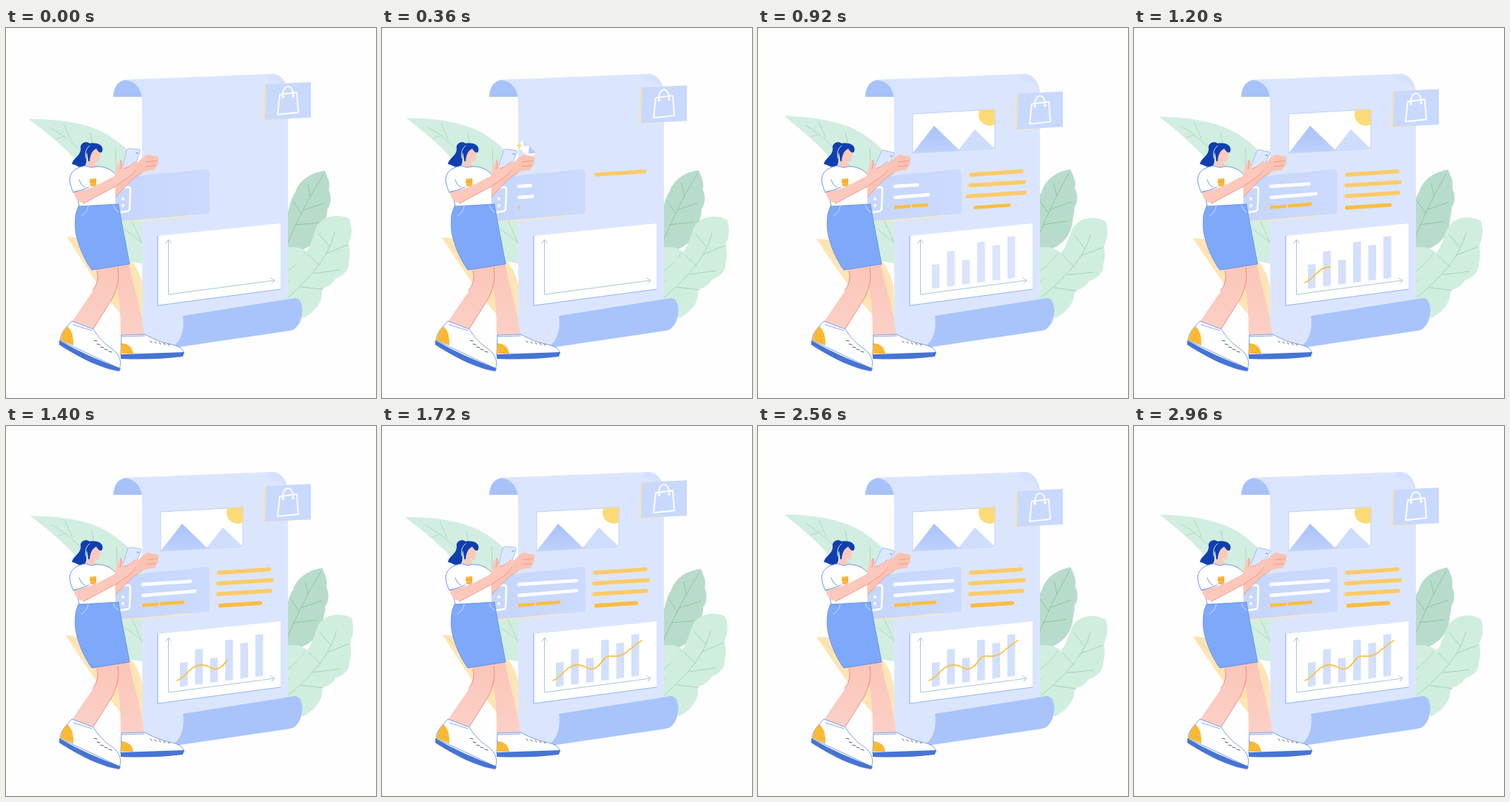
These frames come from a looping animation (500x500 px, 3000 ms). An HTML page:

```html
<!DOCTYPE html>
<html lang="en">
<head>
<meta charset="utf-8">
<style>
html, body { margin: 0; width: 100%; height: 100%; overflow: hidden; background: #fefefe; }
svg { display: block; width: 100vw; height: 100vh; }
.line { fill: none; stroke-linecap: round; stroke-linejoin: round; }
</style>
</head>
<body>
<svg viewBox="0 0 500 500">
  <defs>
    <clipPath id="photoClip"><path d="M209 116L320 110V163L209 169Z"/></clipPath>
    <clipPath id="barClip"><rect id="barWipe" x="220" y="280" width="140" height="90"/></clipPath>
    <linearGradient id="cardFill"><stop stop-color="#c6d6fc"/><stop offset="1" stop-color="#ccdafd"/></linearGradient>
    <linearGradient id="legFill" x2="0" y2="1"><stop stop-color="#fbc5b8"/><stop offset="1" stop-color="#fcd0c7"/></linearGradient>
    <linearGradient id="hillFill" x2="0" y2="1"><stop stop-color="#a9c2fa"/><stop offset="1" stop-color="#bfd1fc"/></linearGradient>
  </defs>

  <g id="yellowLeaf">
    <path fill="#fee5b6" d="M82 282C112 284 142 290 160 304C174 316 183 334 185 350V414C156 396 122 345 82 282Z"/>
    <path class="line" stroke="#f8cf86" stroke-width=".8" d="M88 286Q140 335 180 405M115 309L114 322M150 350L162 340"/>
  </g>
  <g id="leftLeaf">
    <path fill="#d1eee0" d="M31 123C75 123 112 129 137 144C160 158 178 176 186 195V318C160 318 130 300 112 260C106 235 104 200 92 176C74 156 50 138 31 123Z"/>
    <path class="line" stroke="#aed5c3" stroke-width=".9" d="M60 135C100 155 155 220 184 292M88 151L78 130M122 181L114 142M150 216L148 163M80 146L68 150M168 250L184 255M160 272L184 290"/>
  </g>
  <g id="darkLeaf">
    <path fill="#b7dccb" d="M431 193C412 195 396 206 391 222C386 228 384 238 380 252V304C404 302 427 290 431 264C432 256 435 250 434 245C440 238 440 226 436 219C439 211 435 202 431 193Z"/>
    <path class="line" stroke="#93bea9" stroke-width=".9" d="M429 198C412 225 398 251 380 291M411 228L408 211M399 251L388 234M402 246L430 237M391 266L423 263"/>
  </g>
  <g id="lowLeaf">
    <path fill="#d1eee0" d="M378 297C395 293 410 300 414 313L427 345V360C426 375 412 387 402 392L378 385Z"/>
    <path class="line" stroke="#add6c1" stroke-width=".9" d="M380 329Q395 318 404 304M380 343L405 325"/>
  </g>
  <g id="lightLeaf">
    <path fill="#cfeede" d="M464 258C452 251 433 253 425 262C417 268 417 280 413 287C410 298 405 305 396 312C383 330 379 350 380 388L400 385C416 376 423 362 428 352C437 350 442 344 445 339C458 334 464 326 463 315C466 307 464 298 463 291C468 280 468 268 464 258Z"/>
    <path class="line" stroke="#a3cfb9" stroke-width=".9" d="M444 276C437 309 411 337 381 364M437 295L422 278M424 321L408 306M433 305L461 293M415 332L450 327M398 350L428 353"/>
  </g>

  <path fill="#dbe6fe" d="M160 70L360 62C373 63 381 75 381 92V367L240 390C241 410 238 430 221 433C205 431 184 425 184 410V93Z"/>
  <path fill="#d5e1fd" d="M352 63L362 62C374 64 380 75 381 88C377 77 367 72 355 71Z"/>
  <path fill="#a6c2f9" d="M145 93C145 79 153 70 164 70C176 71 183 81 184 93Z"/>
  <path fill="#d8e4fe" d="M160 70L186 69V108L184 100C184 82 175 72 160 70Z"/>
  <path fill="#a8c4fb" d="M239 389L390 365C399 365 402 377 400 387C398 399 393 407 384 409L221 433C236 427 242 408 239 389Z"/>

  <path class="line" stroke="#fde8ba" stroke-width="1.500" d="M157 262L250 253.500"/>
  <path fill="url(#cardFill)" d="M148 203L268 191Q275 190 275 196V247Q275 251 270 251L148 262Z"/>
  <g class="line" stroke="#fff" stroke-width="2.500">
    <path d="M148 218L164 215Q168 214.500 168 219L167 244Q167 247 164 247.500L150 250M153 216C154 208 160 208 161 214"/>
    <path stroke-width="4" d="M158 231h.1M158 240h.1"/>
  </g>
  <g id="cardLines"></g>

  <g id="photo">
    <path fill="#fff" stroke="#b4c9fa" stroke-width=".8" d="M209 116L320 110V163L209 169Z"/>
    <g clip-path="url(#photoClip)">
      <circle cx="313" cy="117" r="15" fill="#fedb76"/>
      <path fill="#cfddfd" d="M270 166L293 137L320 163Z"/>
      <path fill="url(#hillFill)" d="M209 169L238 132L273 166Z"/>
    </g>
  </g>
  <g id="textLines"></g>

  <path fill="#fff" d="M205 281L371 264V353L205 375Z"/>
  <path class="line" stroke="#94b4f6" stroke-width="1.200" d="M205 281V375L371 353"/>
  <g id="bars" clip-path="url(#barClip)" fill="#d3e0fc"></g>
  <path class="line" stroke="#a9c6d8" stroke-width="1" d="M219.500 286V360L363 341M216 291L219.500 286L223 290M358 338L363 341L359 345"/>
  <path id="trend" class="line" stroke="#fac14b" stroke-width="1.800" pathLength="1" stroke-dasharray="1 2" d="M231 344C244 339 249 323 264 323C277 323 279 333 290 326C299 320 299 310 310 311C330 313 332 301 351 290"/>

  <g id="tag">
    <path class="line" stroke="#fde2a5" stroke-width="1.800" d="M350 77L348.500 124L382 122"/>
    <path fill="#c9d9fd" d="M351 76L412 73V121L350 124Z"/>
    <g class="line" stroke="#fff" stroke-width="1.800">
      <path d="M370 90L393 87L395 114L367 117ZM374 93C373 75 388 74 388 91"/>
      <path stroke-width="3.500" d="M374.500 93h.1M388 92h.1"/>
    </g>
  </g>

  <!-- Woman -->
  <path fill="url(#legFill)" d="M149 322L166 318C172 350 184 382 187 417H155C155 385 154 365 149 345Z"/>
  <path fill="url(#legFill)" d="M121 326L154 321C155 345 145 363 136 378L118 407L89 397L113 362C121 352 125 343 123 329Z"/>
  <path class="line" stroke="#ec8f80" stroke-width="1" d="M123 329Q127 342 117 355M151 324Q155 343 144 365L118 406"/>
  <g stroke="#5c8ae8" stroke-width=".8" stroke-linejoin="round">
    <path fill="#fff" d="M89 396C82 404 73 412 73 422L153 460C157 453 154 442 144 434C132 426 125 418 118 407Z"/>
    <path fill="#fff" d="M156 415L155 442L240 440C240 431 229 429 217 426C203 423 197 418 187 414Z"/>
  </g>
  <path fill="#fbb833" d="M83 403Q74 412 74 422L91 429Q92 411 83 403ZM156 426Q170 427 172 440L155 440Z"/>
  <path fill="#4674d4" d="M72 422Q110 444 155 460L153 464C128 460 98 445 72 428ZM155 441L241 438L239 444Q200 449 155 447Z"/>
  <g class="line" stroke="#6b6a68" stroke-width="1.200">
    <path d="M119 422l4 1m0 4l4 1m1 3l4 1m1 2l4 1m2 2l4 1"/>
    <path stroke="#a99678" d="M195 423l2 2m4 -1l2 2m4 -1l2 2m4 -1l2 2m4 -1l2 2"/>
    <path stroke="#7aa0ee" stroke-width=".9" d="M91 401L116 409M157 417L187 416"/>
  </g>

  <path fill="#fbcabd" d="M112 170C112 159 127 160 128 167L126 179Q124 182 120 180L122 188L109 187Z"/>
  <path fill="#0f3eae" d="M113 156C107 151 99 157 101 163C101 173 90 176 89 184C94 184 96 188 103 188C112 185 107 176 109 168C112 178 110 181 113 180C114 171 116 166 122 163C125 168 128 170 130 167C133 159 124 154 113 156Z"/>
  <path class="line" stroke="#fff" stroke-width=".8" d="M108 176Q105 165 113 159"/>
  <path fill="#fbc3b4" d="M147 206L172 188C180 182 184 172 193 171L206 174Q208 177 205 179L206 182Q206 185 203 186C203 191 200 193 197 192L184 195L170 205L148 229Z"/>
  <path fill="#fff" d="M108 186C95 188 86 194 86 206C87 213 89 218 91 222L95 221C96 229 98 235 99 241L148 239L147 197C141 190 132 187 122 187Q115 190 108 186Z"/>
  <path class="line" stroke="#5c8ae8" stroke-width=".9" d="M99 241C98 235 96 229 95 221L91 222C89 218 87 213 86 206C86 194 95 188 108 186Q115 190 122 187C132 187 141 190 147 197"/>
  <path fill="#fbb83c" d="M113 204L122 203V212L120 214H114Z"/>
  <path class="line" stroke="#f19a37" stroke-width="1" d="M113 208L122 207"/>
  <path fill="#7ea9fb" stroke="#5888ee" stroke-width=".8" d="M98 241L152 238C156 264 162 291 167 319L116 327C103 309 92 281 93.500 262Q93 251 98 241Z"/>
  <path class="line" stroke="#dbe7ff" stroke-width=".9" d="M111 241Q110 249 102 254M145 240Q147 246 152 249"/>
  <g id="phone">
    <path fill="#dce8fe" stroke="#9bbbf5" stroke-width=".9" stroke-linejoin="round" d="M165 163L180 164Q182 165 181 167L174 187L157 191L163 165Z"/>
    <path class="line" stroke="#7ca1ee" stroke-width="1.500" d="M176 169h2"/>
  </g>
  <path fill="#fcc8bc" d="M92 222C101 220 116 216 126 211L147 200C149 190 151 182 155 178C159 179 157 186 159 190C164 190 169 187 174 181Q177 179 178 182C176 191 170 200 162 204L148 214L105 237C97 235 93 230 92 222Z"/>
  <path class="line" stroke="#ee9484" stroke-width=".9" d="M105 237L148 214L162 204Q170 200 175 191M155 179Q157 185 154 191M159 190Q168 188 174 181M190 181L205 179M189 187L203 186M148 228L170 205L184 195"/>
  <path class="line" stroke="#5c8ae8" stroke-width=".9" d="M91 222Q104 219 112 215M99 205Q101 212 106 215"/>
</svg>
<script>
const LOOP = 3000, SWAY = 1800;
const $ = id => document.getElementById(id);
const clamp = v => Math.min(1, Math.max(0, v));
const progress = (t, start, length) => clamp((t - start) / length);
const smooth = p => p * p * (3 - 2 * p);
const backOut = p => 1 + 2.7 * (p - 1) ** 3 + 1.7 * (p - 1) ** 2;

function add(parent, name, attrs) {
  const el = document.createElementNS('http://www.w3.org/2000/svg', name);
  for (const key in attrs) el.setAttribute(key, attrs[key]);
  return $(parent).appendChild(el);
}
const stroke = (parent, color, width) =>
  add(parent, 'path', { class: 'line', stroke: color, 'stroke-width': width });

// Eased value through [time, value] keys
function keyed(keys, t) {
  const i = keys.findIndex(k => k[0] > t);
  if (i === 0) return keys[0][1];
  if (i < 0) return keys[keys.length - 1][1];
  const [t0, a] = keys[i - 1], [t1, b] = keys[i];
  return a + (b - a) * smooth((t - t0) / (t1 - t0));
}

const cardLines = [
  { x: 185, y: 214, dx: 78, dy: -5, color: '#fff', width: 4.5, keys: [[200, 0], [600, .56], [920, .39], [1400, .82], [1720, 1]] },
  { x: 185, y: 229, dx: 78, dy: -6.5, color: '#fff', width: 4.5, keys: [[200, 0], [600, .66], [920, .58], [1400, .9], [1720, 1]] },
  { x: 184, y: 242.5, dx: 57, dy: -4.5, color: '#fbbd45', width: 4.5, keys: [[320, 0], [600, .39], [920, .8], [1250, 1]] }
].map(l => ({ ...l, el: stroke('cardLines', l.color, l.width) }));
const dashed = cardLines[2].el;
dashed.setAttribute('stroke-dasharray', '22 2 40');
dashed.style.strokeLinecap = 'butt';

const textLines = [
  [322, 196, 34, '#fccb69'], [323, 210.5, 36, '#fccb69'],
  [322, 225, 35, '#fccb69'], [316.5, 241, 27, '#fbbd45']
].map(([x, y, half, color], i) =>
  ({ x, y, half, start: 160 + 200 * i, el: stroke('textLines', color, 5.5) }));

[319, 301, 313, 288.5, 293, 281].forEach((top, i) => {
  const x = 235 + 20.4 * i, base = 352 - 2.7 * i;
  add('bars', 'path', { d: `M${x} ${top + 1}l10.500 -1V${base - 1}l-10.500 1.400Z` });
});

const turn = (id, angle, x, y) => $(id).setAttribute('transform', `rotate(${angle} ${x} ${y})`);

function draw(t) {
  const sway = (1 - Math.cos(2 * Math.PI * t / SWAY)) / 2;
  turn('leftLeaf', 1.5 * sway, 185, 300);
  turn('yellowLeaf', -1.5 * sway, 185, 412);
  turn('darkLeaf', -2.5 * sway, 380, 400);
  turn('lightLeaf', 2.5 * sway, 380, 400);
  turn('lowLeaf', .6 * sway, 380, 400);
  $('tag').setAttribute('transform', `translate(0 ${12.7 * sway})`);
  $('phone').setAttribute('transform', `translate(0 ${2.5 * sway}) rotate(${11 * sway} 170 185)`);

  for (const l of cardLines) {
    const p = keyed(l.keys, t);
    l.el.setAttribute('d', p > 0 ? `M${l.x} ${l.y}l${l.dx * p} ${l.dy * p}` : '');
  }
  for (const l of textLines) {
    const p = progress(t, l.start, 600), s = backOut(p), h = l.half * s;
    l.el.setAttribute('d', p > 0 ? `M${l.x - h} ${l.y + h * .065}L${l.x + h} ${l.y - h * .065}` : '');
    l.el.setAttribute('stroke-width', 5.5 * clamp(s));
  }

  const grow = 1 - (1 - progress(t, 300, 500)) ** 2;
  $('photo').setAttribute('transform',
    `translate(209 169) rotate(${-170 * (1 - grow)}) scale(${grow}) translate(-209 -169)`);

  const rise = progress(t, 400, 430);
  $('barWipe').setAttribute('y', 355 - 76 * rise);
  $('bars').setAttribute('opacity', .7 + .3 * progress(t, 600, 700));

  const trend = progress(t, 1000, 700);
  $('trend').setAttribute('stroke-dashoffset', 1 - trend);
  $('trend').setAttribute('visibility', trend > 0 ? 'visible' : 'hidden');
}

const begin = performance.now();
function frame() {
  draw((performance.now() - begin) % LOOP);
  requestAnimationFrame(frame);
}
draw(0);
requestAnimationFrame(frame);
</script>
</body>
</html>
```
